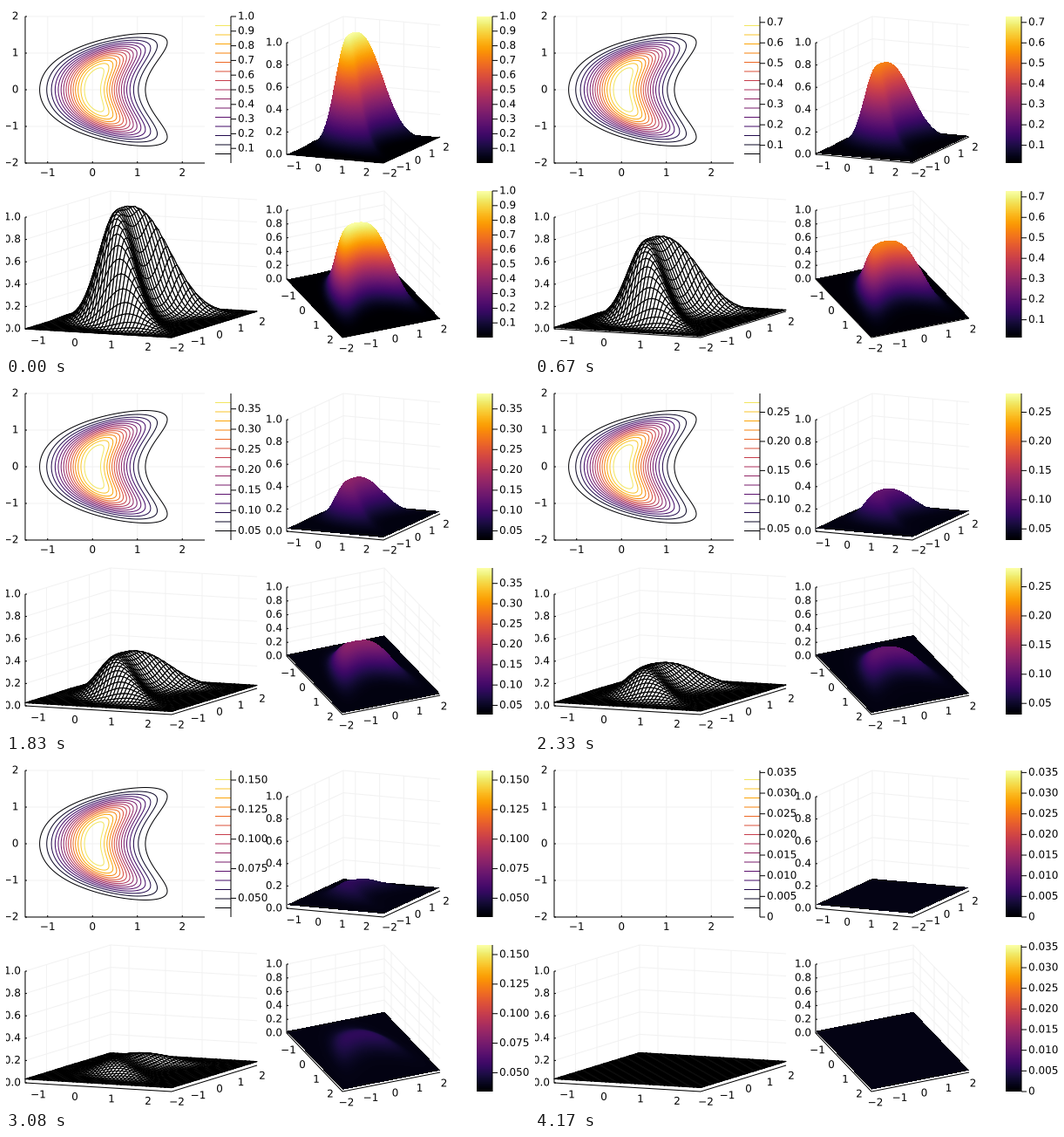
A matplotlib script for the animation above (4.26 s loop, 600 by 400 pixels).

```python
import math

import matplotlib.pyplot as plt
import numpy as np
from matplotlib.animation import FuncAnimation
from matplotlib.collections import LineCollection, PolyCollection
from matplotlib.patches import PathPatch
from matplotlib.path import Path
from matplotlib.textpath import TextPath

W, H, DPI = 600, 400, 100
PX = 72 / DPI
LOOP, FRAMES, STEPS = 4260, 71, 50
STEP_MS = 250 / 3
FLAT = 0.0965
X0, X1, Y0, Y1 = -1.5, 2.5, -2, 2
EM = 12
GRID = "#f2f2f2"

plt.rcParams["font.family"] = "DejaVu Sans"
inferno = plt.get_cmap("inferno")

fig = plt.figure(figsize=(W / DPI, H / DPI), dpi=DPI, facecolor="white")
ax = fig.add_axes([0, 0, 1, 1])
ax.axis("off")
labels = []


def banana(x, y):
    return np.exp(-(x**2 + (x - y**2) ** 2))


def blend(g, t):
    """Banana hill fading into a uniform level."""
    return math.exp(-t) * ((1 - t) * g + t * FLAT)


def advance(s):
    return EM * sum({".": 0.318, "\u2212": 0.838}.get(c, 0.636) for c in s)


def glyphs(x, y, s, align=0.5):
    """Outline of s around height y; align is 0 left, 0.5 centre, 1 right."""
    p = TextPath((0, 0), s, size=EM)
    x -= align * advance(s)
    return Path(p.vertices * (1, -1) + (x, y + 3.4), p.codes)


def label(*args):
    labels.append(glyphs(*args))


def add_text(paths):
    patch = PathPatch(Path.make_compound_path(*paths), fc="black", lw=0,
                      snap=False, zorder=6)
    return ax.add_patch(patch)


def lines(segs, color="black", z=2):
    lc = LineCollection(segs, colors=color, linewidths=PX, zorder=z, snap=False)
    ax.add_collection(lc)
    return lc


def num(v):
    return str(v).replace("-", "\u2212")


def mesh(n):
    """Grid ordered from the far corner to the near one."""
    return np.meshgrid(np.linspace(X0, X1, n), np.linspace(Y1, Y0, n))


class Box:
    """Orthographic box given by its left, front and right floor corners."""

    def __init__(self, left, front, right, height, x_off, y_off):
        self.o = np.array(left, float)
        self.u = np.array(front, float) - left
        self.v = np.array(right, float) - front
        self.h = height
        self.draw_frame(x_off, y_off)

    def at(self, x, y, z=0):
        a, b = (x - X0) / (X1 - X0), (y - Y0) / (Y1 - Y0)
        px = self.o[0] + a * self.u[0] + b * self.v[0]
        py = self.o[1] + a * self.u[1] + b * self.v[1] - self.h * z
        return px, py

    def draw_frame(self, x_off, y_off):
        at = self.at
        grid, ticks = [], []
        for x in range(-1, 3):
            grid.append([at(x, Y0), at(x, Y1), at(x, Y1, 1)])
            px, py = at(x, Y0)
            label(px + x_off[0], py + x_off[1], num(x))
        for y in range(-2, 3):
            grid.append([at(X1, y), at(X0, y), at(X0, y, 1)])
            px, py = at(X1, y)
            label(px + y_off[0], py + y_off[1], num(y))
        for k in range(6):
            z = k / 5
            grid.append([at(X0, Y0, z), at(X0, Y1, z), at(X1, Y1, z)])
            px, py = at(X0, Y0, z)
            ticks.append([(px, py), (px + 2, py)])
            label(px - 5, py, f"{z:.1f}", 1)
        lines(grid, GRID, 1)
        lines(ticks)
        lines([[at(X0, Y0, 1), at(X0, Y0), at(X1, Y0), at(X1, Y1)]])


# contour panel
def flat_xy(x, y):
    return 22 + (x - X0) * 51.5, 96 - 42 * y


for x in range(-1, 3):
    px = flat_xy(x, 0)[0]
    lines([[(px, 12), (px, 180)]], GRID, 1)
    lines([[(px, 180), (px, 178)]])
    label(px, 191.5, num(x))
for y in range(-2, 3):
    py = flat_xy(0, y)[1]
    lines([[(22, py), (228, py)]], GRID, 1)
    lines([[(22, py), (24, py)]])
    label(14.5, py, num(y), 1)
lines([[(22, 12), (22, 180), (228, 180)]])

levels = np.arange(1, 16) / 16
shades = [inferno(k / 15) for k in range(15)]
gx, gy = mesh(161)
cx, cy = flat_xy(gx, gy)
rings = ax.contour(cx, cy, banana(gx, gy), levels=levels, colors=shades,
                   linewidths=PX, zorder=3)
lines([[(240, 180 - 168 * v), (258, 180 - 168 * v)] for v in levels], shades)

# 3D panels
hill = Box((322, 170), (433, 180), (498, 150), 128, (-5.5, 12.5), (7, 12.3))
wire = Box((22, 370), (190, 380), (288, 350), 128, (-6, 12.7), (6, 12.3))
tilt = Box((322, 313), (386, 380), (498, 358), 79, (-6, 11.5), (4.5, 13))
add_text(labels)

# surface samples lying close to the centre line of a pixel column
sx, sy = (a.ravel() for a in mesh(801))
floors = []
for box in (hill, tilt):
    px, py = box.at(sx, sy)
    keep = abs(px % 1 - 0.5) < 0.25
    floors.append((px[keep].astype(int), py[keep], box.h,
                   banana(sx[keep], sy[keep])))

surface = ax.imshow(np.zeros((H, W, 4), np.uint8), extent=(0, W, H, 0),
                    aspect="auto", interpolation="nearest", zorder=3)

wx, wy = mesh(41)
wg = banana(wx, wy)
net = PolyCollection([], facecolors="white", edgecolors="black",
                     linewidths=1.1 * PX, zorder=3)
ax.add_collection(net)

# colour bars
bars = [(258, 12), (558, 12), (558, 212)]
for bx, by in bars:
    lines([[(bx, by), (bx, by + 168)]], z=5)
    if bx > 300:
        ax.imshow(np.linspace(1, 0, 256)[:, None], cmap=inferno, aspect="auto",
                  extent=(bx - 18, bx, by + 168, by), zorder=2)
bar_ticks = lines([], z=5)
bar_text = add_text([glyphs(0, 0, "0")])

ax.set_xlim(0, W)
ax.set_ylim(H, 0)


def tick_step(span):
    """Tick distance and number of decimals for a value range."""
    n = math.floor(math.log10(span))
    f = span / 10**n
    if f > 5:
        unit, extra = 1, 0
    elif f > 2.5:
        unit, extra = 0.5, 1
    elif f > 1:
        unit, extra = 0.25, 2
    else:
        unit, extra = 0.1, 1
    return unit * 10**n, extra - n


def set_bars(lo, hi):
    step, digits = tick_step(hi - lo)
    first, last = math.ceil(lo / step), math.floor(hi / step + 1e-9)
    marks, texts = [], []
    for bx, by in bars:
        for k in range(first, last + 1):
            y = by + 168 * (hi - k * step) / (hi - lo)
            s = f"{k * step:.{digits}f}" if k else "0"
            texts.append(glyphs(bx + 8, y, s, 0))
            marks.append([(bx, y), (bx + 6, y)])
    bar_ticks.set_segments(marks)
    bar_text.set_path(Path.make_compound_path(*texts))


def set_surface(t):
    img = np.full((H, W), np.nan)
    for col, base, h, g in floors:
        z = blend(g, t)
        img[(base - h * z).astype(int), col] = z  # nearer points overwrite
    # the topmost, partly covered pixel of each column stays empty
    img[1:][np.isnan(img[:-1])] = np.nan
    surface.set_data(inferno(img, bytes=True))


def set_net(t):
    p = np.stack(wire.at(wx, wy, blend(wg, t)), axis=-1)
    quads = np.stack([p[:-1, :-1], p[:-1, 1:], p[1:, 1:], p[1:, :-1]], axis=2)
    net.set_verts(quads.reshape(-1, 4, 2))


shown = None


def show(step):
    global shown
    if step == shown:
        return
    shown = step
    t = step / STEPS
    uniform = step == STEPS
    rings.set_visible(not uniform)
    set_bars(0 if uniform else blend(banana(X0, Y0), t), blend(1, t))
    set_surface(t)
    set_net(t)


def update(frame):
    end = (frame + 1) * LOOP / FRAMES - 1
    show(min(STEPS, int(end / STEP_MS)))
    return []


def init():
    return update(0)


anim = FuncAnimation(fig, update, frames=FRAMES, interval=LOOP // FRAMES,
                     init_func=init, repeat=True, blit=False)
plt.show()
```
